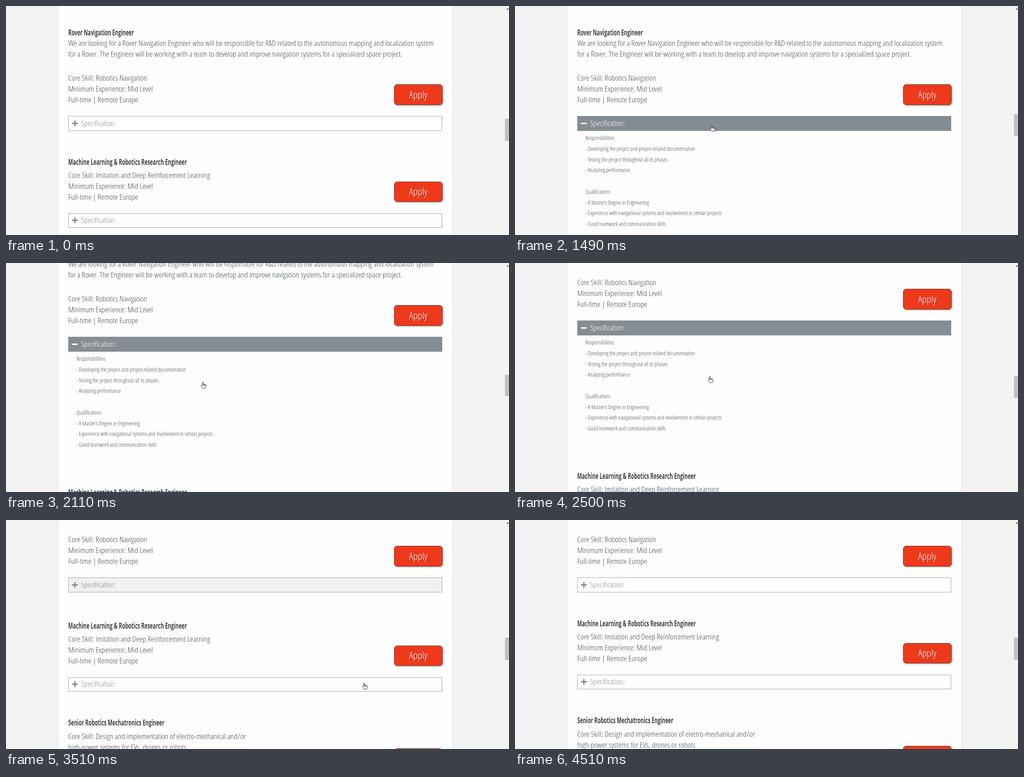
These frames come from a looping animation (1107 px wide and 506 px high, 4600 ms). An HTML page:

```html
<!DOCTYPE html>
<html lang="en">
<head>
<meta charset="utf-8">
<title>Job listings</title>
<style>
html, body { margin: 0; width: 100%; height: 100%; overflow: hidden; }
body { position: relative; background: #f3f3f3; font: 300 17px/24px "Open Sans", "Noto Sans", sans-serif; font-stretch: 75%; color: #414b55; }
body div, body span, svg { position: absolute; }
#card { left: 115px; top: 0; width: 867px; height: 506px; background: #fefefe; box-shadow: 0 0 3px rgba(0,0,0,.13); }
#page, #rest { left: 0; top: 0; width: 1107px; height: 0; }
#panel { left: 137px; top: 276px; width: 823px; overflow: hidden; }
.text { white-space: pre; transform: scaleX(var(--light, .87)); transform-origin: 0 50%; }
.title { font-weight: 700; color: #3a4248; transform: scaleX(var(--bold, .8)); }
.small { font-size: 12px; }
.apply { left: 854px; width: 104.5px; height: 43.5px; border: 1px solid #5c3f3b; border-radius: 7px; background: #ee391b; box-shadow: 2px 2px 3px rgba(0,0,0,.22); }
.apply span { left: 0; width: 100%; text-align: center; font-size: 21.5px; color: #fff; text-shadow: 1px 1px 2px rgba(0,0,0,.3); transform-origin: 50% 50%; }
.bar { left: 136.5px; width: 821.5px; height: 30.5px; border: 1px solid #a1a5a8; color: rgb(133,141,148); }
.bar i { position: absolute; left: 7.5px; top: 13.5px; width: 13px; height: 3.2px; border-radius: 1px; background: currentColor; }
.bar i + i { transform: rotate(90deg); }
#track { left: 1098px; top: 0; width: 9px; height: 506px; background: #f4f4f3; }
#thumb { left: 0; width: 9px; background: #c1c1c1; }
#up { left: 2.5px; top: 5px; border: 3px solid transparent; border-top: 0; border-bottom: 3.5px solid #505050; }
#pointer { left: 0; top: 0; overflow: visible; fill: #fff; stroke: #222; stroke-linejoin: round; }
</style>
</head>
<body>
<div id="card"></div>
<div id="page"><div id="panel"></div><div id="rest"></div></div>
<div id="track"><div id="up"></div><div id="thumb"></div></div>
<svg id="pointer" width="12" height="16">
  <path id="hand" stroke-width=".95" d="M-2.9-6.4Q-1.8-7.5-.8-6.4V-1.8Q.2-2.7 1.2-1.6Q2.3-2.3 3.1-1.2Q4.6-1.5 4.9 0V3.2Q4.6 5 3.6 7H-1.6Q-3.6 4.4-5.4 1.6Q-5.4.1-4-.1L-2.9 1Z M1.2-1.6V.8M3.1-1.2V1M-.8-1.8V.8"/>
  <path id="arrow" stroke-width=".8" d="M-3.5-6V4.4L-1.2 2.3L.3 5.8L2 5L.5 1.7H3.8Z"/>
</svg>
<script>
const LOOP = 4600, STEP = 77.7, PANEL = 241.5;
const $ = id => document.getElementById(id);

function add(parent, tag, cls, top, text = '') {
  const el = document.createElement(tag);
  el.className = cls;
  el.style.top = top + 'px';
  el.textContent = text;
  parent.append(el);
  return el;
}
function line(parent, x, mid, text, cls = '') {
  const el = add(parent, 'span', 'text ' + cls, mid - 12, text);
  el.style.left = x + 'px';
  return el;
}
function lines(parent, x, mid, list, cls) {
  list.forEach((text, i) => text && line(parent, x, mid + i * 23.75, text, cls));
}
function apply(parent, top) {
  const el = add(parent, 'div', 'apply', top);
  add(el, 'span', 'text', 9.5, 'Apply');
  return el;
}
function bar(parent, top) {
  const el = add(parent, 'div', 'bar', top);
  el.append(document.createElement('i'), document.createElement('i'));
  line(el, 27.5, 14.5, 'Specification:');
  return el;
}

const page = $('page'), rest = $('rest'), panel = $('panel');
const level = ['Minimum Experience: Mid Level', 'Full-time | Remote Europe'];
const intro = 'We are looking for a Rover Navigation Engineer who will be responsible for R&D related to the autonomous mapping and localization system';

line(page, 137, 58.5, 'Rover Navigation Engineer', 'title');
lines(page, 137, 82, [intro,
  'for a Rover. The Engineer will be working with a team to develop and improve navigation systems for a specialized space project.']);
lines(page, 137, 159, ['Core Skill: Robotics Navigation', ...level]);
apply(page, 173);
const spec = bar(page, 243);
lines(panel, 18, 16, ['Responsibilities',
  '- Developing the project and project-related documentation',
  '- Testing the project throughout all its phases',
  '- Analyzing performance', '', 'Qualifications',
  '- A Master’s Degree in Engineering',
  '- Experience with navigational systems and involvement in similar projects',
  '- Good teamwork and communication skills'], 'small');

const heading = line(rest, 137, 344.5, 'Machine Learning & Robotics Research Engineer', 'title');
lines(rest, 137, 374, ['Core Skill: Imitation and Deep Reinforcement Learning', ...level]);
const second = apply(rest, 387.5);
bar(rest, 457.5);
line(rest, 137, 559, 'Senior Robotics Mechatronics Engineer', 'title');
lines(rest, 137, 589, ['Core Skill: Design and implementation of electro-mechanical and/or',
  'high-power systems for EVs, drones or robots']);
apply(rest, 614.5);

// One condensing factor per weight, from the mean advance of a narrow face.
function condense(name, el, advance) {
  const mean = el.getBoundingClientRect().width / el.textContent.length / 17;
  document.body.style.setProperty(name, advance / mean);
}
const sample = line(page, 0, 0, intro);
sample.style.transform = heading.style.transform = 'none';
condense('--light', sample, .3478);
condense('--bold', heading, .3412);
sample.remove();
heading.style.transform = '';

// Tracks: [step, ...values], interpolated linearly.
const GREY = [133, 141, 148], WHITE = [255, 255, 255], HOVER = [230, 230, 230];
const fill = [[9, ...WHITE], [12, ...HOVER], [13, ...HOVER], [16, ...GREY], [41, ...GREY],
  [44, 231, 233, 234], [45, 240, 241, 241], [47, ...WHITE]];
const ink = [[13, ...GREY], [16, ...WHITE], [38, ...WHITE], [40, ...GREY]];
const scroll = [[24, 0], [25, 14], [26, 46], [27, 80], [28, 105], [29, 116]];
const route = [[3, 885, 421], [4, 648.5, 329], [6, 648.5, 329], [8, 604, 302], [10, 548, 270], [13, 518, 257],
  [15, 480, 263], [19, 435, 270], [31, 435, 270], [33, 426, 245], [36, 400, 166], [38, 394, 148], [41, 392, 147],
  [42, 455, 180], [43, 580, 255], [45, 790, 367], [47, 920, 425], [50, 1060, 476], [52, 1090.5, 489], [56, 1099, 513],
  [57, 1099, 513], [58, 1084.5, 511]];

function at(track, n) {
  const i = track.findIndex(k => k[0] > n);
  if (i === 0) return track[0].slice(1);
  if (i < 0) return track[track.length - 1].slice(1);
  const a = track[i - 1], b = track[i], p = (n - a[0]) / (b[0] - a[0]);
  return a.slice(1).map((v, j) => v + (b[j + 1] - v) * p);
}
function swing(n, start) {
  const p = Math.min(1, Math.max(0, (n - start) / 5.53));
  return .5 - Math.cos(Math.PI * p) / 2;
}
const rgb = c => `rgb(${c.map(Math.round)})`;

function draw(time) {
  const n = Math.floor((time % LOOP + 12) / STEP);
  const open = swing(n, 13.4) - swing(n, 40);
  const [y] = at(scroll, n);
  page.style.transform = `translateY(${-y}px)`;
  rest.style.transform = `translateY(${open * PANEL}px)`;
  panel.style.height = open * PANEL + 'px';

  const back = rgb(at(fill, n));
  spec.style.background = back;
  spec.style.color = rgb(at(ink, n));
  spec.style.borderColor = n > 14 && n < 43 ? back : '';
  spec.children[1].style.display = n > 13 && n < 40 ? 'none' : '';
  second.style.background = n === 3 ? '#d0301a' : '';

  $('thumb').style.top = 249 - 10 * open + y * 11 / 116 + 'px';
  $('thumb').style.height = 49 - 1.5 * open + 'px';

  const [px, py] = at(route, n);
  const hand = n === 3 || n > 9 && n < 42 || n === 45;
  $('pointer').style.display = n < 3 ? 'none' : '';
  $('pointer').style.transform = `translate(${px}px, ${py}px)`;
  $('hand').style.display = hand ? '' : 'none';
  $('arrow').style.display = hand ? 'none' : '';
}

const begin = performance.now();
function tick() {
  draw(performance.now() - begin);
  requestAnimationFrame(tick);
}
tick();
</script>
</body>
</html>
```
